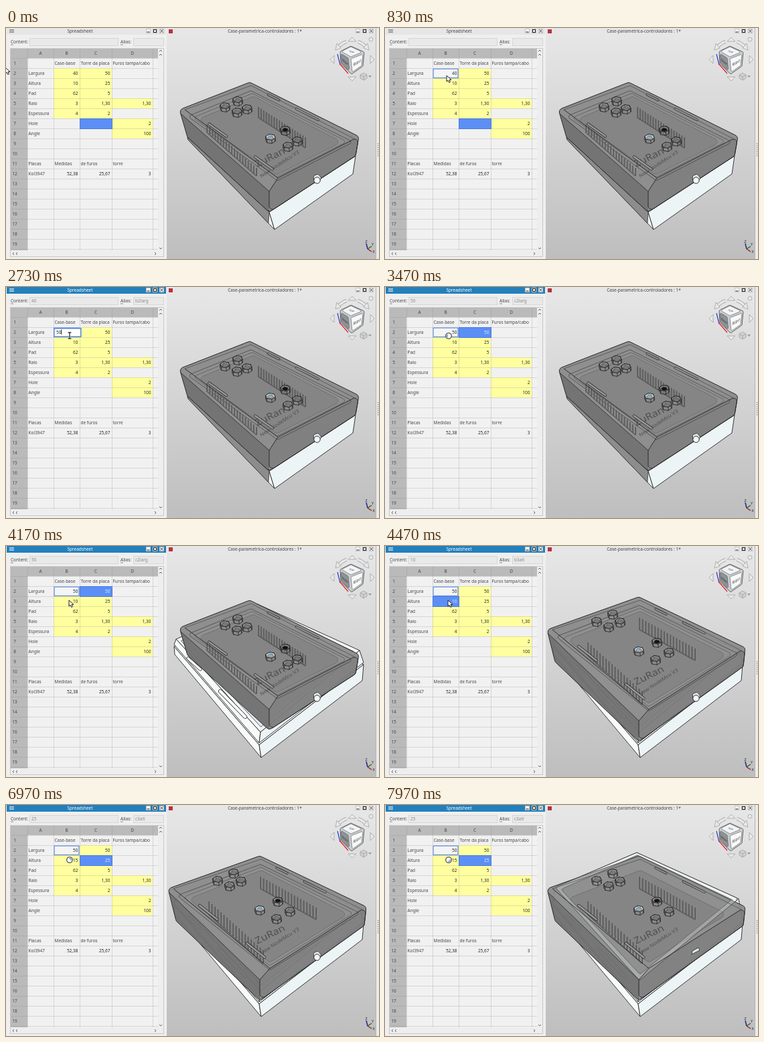
Recreate the animation shown at these times as an HTML page with a canvas. Size 557 by 345 pixels, loop 8000 ms.

```html
<!DOCTYPE html>
<html lang="pt">
<head>
<meta charset="utf-8">
<title>Spreadsheet</title>
<style>
  html, body { margin: 0; width: 100%; height: 100%; overflow: hidden; background: #efefef; }
  canvas { display: block; width: 557px; height: 345px; }
</style>
</head>
<body>
<canvas id="stage"></canvas>
<script>
const LOOP = 8000;
const FONT = '"Noto Sans", "Open Sans", sans-serif';
const INK = '#474747', BLUE = '#5c8ff6', FOCUS = '#6d93d8', YELLOW = '#ffffa0';
const canvas = document.getElementById('stage');
const ratio = window.devicePixelRatio || 1;
canvas.width = 557 * ratio;
canvas.height = 345 * ratio;
const c = canvas.getContext('2d');

// ---------- drawing helpers ----------
function rect(x, y, w, h, fill, stroke) {
  if (fill) { c.fillStyle = fill; c.fillRect(x, y, w, h); }
  if (stroke) { c.strokeStyle = stroke; c.lineWidth = 1; c.strokeRect(x + .5, y + .5, w - 1, h - 1); }
}

function text(s, x, y, align = 'left', color = INK, size = 6.5) {
  c.font = `${size}px ${FONT}`;
  c.textAlign = align;
  c.fillStyle = color;
  c.fillText(s, x, y + size * .36);
}

function line(pts, color, width = 1) {
  c.beginPath();
  pts.forEach(p => c.lineTo(...p));
  c.strokeStyle = color;
  c.lineWidth = width;
  c.stroke();
}

// Closed polygon, optionally with rounded corners.
function poly(pts, fill, stroke, width = .9, r = 0) {
  const n = pts.length, last = pts[n - 1];
  c.beginPath();
  if (r) {
    c.moveTo((last[0] + pts[0][0]) / 2, (last[1] + pts[0][1]) / 2);
    pts.forEach((p, i) => c.arcTo(...p, ...pts[(i + 1) % n], r));
  } else {
    pts.forEach(p => c.lineTo(...p));
  }
  c.closePath();
  if (fill) { c.fillStyle = fill; c.fill(); }
  if (stroke) { c.strokeStyle = stroke; c.lineWidth = width; c.stroke(); }
}

function disc(x, y, r, fill, stroke, width = 1) {
  c.beginPath();
  c.arc(x, y, r, 0, 7);
  if (fill) { c.fillStyle = fill; c.fill(); }
  if (stroke) { c.strokeStyle = stroke; c.lineWidth = width; c.stroke(); }
}

const mix = (a, b, k) => [a[0] + (b[0] - a[0]) * k, a[1] + (b[1] - a[1]) * k];
const shift = ([x, y], dx, dy) => [x + dx, y + dy];
const down = (p, d) => shift(p, 0, d);
// Point on a quad [left, front, right, back]: u runs left to front, v left to back.
const at = (q, u, v) => mix(mix(q[0], q[1], u), mix(q[3], q[2], u), v);
const inset = (q, k) => [at(q, k, k), at(q, 1 - k, k), at(q, 1 - k, 1 - k), at(q, k, 1 - k)];

// ---------- timeline ----------
function sheetState(t) {
  const s = { active: t >= 1100, content: '', alias: '', sel: 'C7', b2: '40', b3: '10', edit: null };
  if (t >= 1100) Object.assign(s, { content: '40', alias: 'b2larg', sel: 'B2' });
  if (t >= 1700) s.sel = '', s.edit = { row: 2, value: t < 1870 ? '5' : '50', caret: t < 2230 || t >= 2730 };
  if (t >= 2900) Object.assign(s, { content: '50', alias: 'c2larg', sel: 'C2', b2: '50', edit: null });
  if (t >= 4470) Object.assign(s, { content: '10', alias: 'b3alt', sel: 'B3' });
  if (t >= 5730) s.sel = '', s.edit = { row: 3, value: t < 5870 ? '1' : '15', caret: t < 6000 || t >= 6500 };
  if (t >= 6830) Object.assign(s, { content: '25', alias: 'c3alt', sel: 'C3', b3: '15', edit: null });
  return s;
}

function pointer(t) {
  if (t < 1700) {
    const k = Math.min(1, Math.max(0, (t - 300) / 530));
    return ['arrow', ...mix([-1, 59], [92, 71], k * k * (3 - 2 * k))];
  }
  if (t < 2900) return ['beam', 95, 72.5];
  if (t < 4150) return ['busy', 95, 73 + 7 * Math.min(1, Math.max(0, (t - 3500) / 200))];
  if (t < 5730) return ['arrow', 94, 81];
  if (t < 6830) return ['beam', 95, 82];
  return ['busy', 95, 82];
}

// ---------- windows ----------
function titleBar(x, w, title, mid, active) {
  rect(x, 0, w, 10, active ? '#2280bd' : '#e6e6e6');
  text(title, mid, 4.8, 'center', active ? '#fff' : '#444');
}

function buttons(x) {
  [0, 10, 20].forEach(d => rect(x + d, 1, 7, 7, '#f6f6f6', '#c4c4c4'));
  line([[x + 1.5, 6], [x + 5.5, 6]], '#222');
  rect(x + 11, 2, 5, 5, null, '#222');
  line([[x + 21.5, 2.5], [x + 25.5, 6.5]], '#222');
  line([[x + 25.5, 2.5], [x + 21.5, 6.5]], '#222');
}

function chevron(x, y, dx, dy) {
  line([[x - dx - dy * 2, y - dy - dx * 2], [x + dx, y + dy], [x - dx + dy * 2, y - dy + dx * 2]], '#555', .9);
}

// ---------- spreadsheet ----------
const COLS = { A: [32, 71], B: [71, 110], C: [110, 158], D: [158, 219] };
const rowTop = n => 30 + 15 * n;
const yellow = new Set('B2 B3 B4 B5 B6 C2 C3 C4 C5 C6 D5 D7 D8'.split(' '));
const labels = {
  B1: 'Case-base', C1: 'Torre da placa', D1: 'Furos tampa/cabo', A2: 'Largura', A3: 'Altura', A4: 'Pad',
  A5: 'Raio', A6: 'Espessura', A7: 'Hole', A8: 'Angle', A11: 'Placas', B11: 'Medidas', C11: 'de furos',
  D11: 'torre', A12: 'Kol3947'
};
const numbers = {
  C2: '50', C3: '25', B4: '62', C4: '5', B5: '3', C5: '1,30', D5: '1,30', B6: '4', C6: '2',
  D7: '2', D8: '100', B12: '52,38', C12: '25,67', D12: '3'
};

function cellBox(id) {
  const [l, r] = COLS[id[0]];
  return [l, rowTop(+id.slice(1)), r - l, 15];
}

function sheet(t) {
  const s = sheetState(t);
  rect(0, 0, 240, 345, '#efefef');
  titleBar(1, 238, 'Spreadsheet', 110.5, s.active);
  [2.5, 4.5, 6.5].forEach(y => line([[5, y], [12, y]], s.active ? '#d8e8f2' : '#777'));
  buttons(209);
  text('Content:', 7, 21);
  text('Alias:', 171, 21);
  line([[7, 25], [11, 25]], INK, .6);
  line([[171, 25], [175, 25]], INK, .6);
  rect(35, 15, 133, 12, '#e9e9e9', '#d6d6d6');
  rect(190, 15, 46, 12, '#e9e9e9', '#d6d6d6');
  text(s.content, 38, 21, 'left', '#8a8a8a');
  text(s.alias, 193, 21, 'left', '#8a8a8a');

  rect(6, 30, 230, 312, '#f1f1f1', '#c8c8c8');
  rect(7, 31, 220, 14, '#bababa');
  rect(7, 31, 25, 301, '#bababa');
  yellow.forEach(id => rect(...cellBox(id), YELLOW));

  for (let n = 1; n <= 20; n++) {
    const y = rowTop(n) + .5;
    line([[7, y], [32, y]], '#adadad');
    line([[32, y], [227, y]], 'rgba(120,120,120,.22)');
  }
  [32, 71, 110, 158, 219].forEach(x => {
    line([[x + .5, 31], [x + .5, 45]], '#adadad');
    line([[x + .5, 45], [x + .5, 332]], 'rgba(120,120,120,.22)');
  });

  if (t >= 700) {
    rect(71, 60, 39, 15, '#f4f4f4');
    c.strokeStyle = FOCUS;
    c.lineWidth = 1.4;
    c.strokeRect(72, 61, 37, 13.5);
  }
  if (s.sel) {
    const [x, y, w, h] = cellBox(s.sel);
    rect(x, y, w + 1, h + 1, BLUE, '#4a7ae0');
  }

  for (const col in COLS) text(col, (COLS[col][0] + COLS[col][1]) / 2, 38, 'center');
  for (let n = 1; n <= 19; n++) text(n, 13, rowTop(n) + 7.5, 'center');
  for (const id in labels) {
    const [x, y] = cellBox(id);
    text(labels[id], x + 1.5, y + 7.5);
  }
  const values = { ...numbers, B2: s.b2, B3: s.b3 };
  for (const id in values) {
    const [x, y, w] = cellBox(id);
    text(values[id], x + w - 2.5, y + 7.5, 'right', id === s.sel ? '#e4ecff' : '#2a2a2a');
  }

  if (s.edit) {
    const y = rowTop(s.edit.row);
    rect(71, y + 1, 41, 14, '#fff');
    c.strokeStyle = '#4f83dc';
    c.lineWidth = 1.5;
    c.strokeRect(71.8, y + 1.8, 40, 12.4);
    text(s.edit.value, 75, y + 7.2, 'left', '#222');
    const x = 75.3 + 3.72 * s.edit.value.length;
    if (s.edit.caret) line([[x, y + 3.5], [x, y + 11]], '#111', .9);
  }

  rect(227, 31, 8, 301, '#eeeeee');
  rect(7, 332, 228, 9, '#eeeeee');
  chevron(231, 34, 0, -1);
  chevron(231, 40, 0, -1);
  chevron(231, 329, 0, 1);
  chevron(11, 337, -1, 0);
  chevron(16, 337, -1, 0);
  chevron(223, 337, 1, 0);
}

// ---------- enclosure model ----------
const EDGE = '#252525';
const smallCase = {
  top: [[264, 121], [406, 224], [527, 162], [364, 81]],
  low: [[271, 163], [393, 275], [522, 191]],
  nuts: [[346, 109], [327, 118], [360, 121], [345, 126], [395, 165], [417, 153], [435, 169], [421, 177]],
  pins: [[[300, 144], [374, 209], 12], [[377, 118], [447, 163], 16]]
};
const wideCase = {
  top: [[247, 124], [394, 244], [538, 152], [379, 76]],
  low: [[254, 173], [379, 292], [535, 180]],
  nuts: [[340, 102], [316, 113], [351, 114], [334, 121], [379, 157], [406, 144], [424, 159], [404, 170]],
  pins: [[[303, 144], [384, 217], 20], [[380, 107], [463, 153], 18]]
};
const smallFoot = [[272, 167], [401, 301], [518, 218]];
const wideFoot = [[252, 162], [381, 316], [532, 201]];
const wideRim = [[251, 150], [378, 297], [534, 177], [380, 104]];
const wideLip = [[254, 139], [380, 278], [528, 156], [376, 87]];
const tallLip = wideLip.map(p => down(p, -16));

function capsule(a, b, fill, w) {
  c.lineCap = 'round';
  line([a, b], EDGE, w);
  line([a, b], fill, w - 1.4);
  c.lineCap = 'butt';
}

function walls([l, f, r], [l2, f2, r2]) {
  poly([l, f, f2, l2], '#f8fafa', EDGE);
  poly([f, r, r2, f2], '#edf4f6', EDGE);
}

function ring(x, y, rx, ry) {
  return [0, 1, 2, 3, 4, 5].map(k =>
    [x + rx * Math.cos(k * 1.047 + .25), y + ry * Math.sin(k * 1.047 + .25)]);
}

function nut([x, y], i) {
  const a = ring(x, y - 2, 7.5, 4.6), b = ring(x, y + 3, 7.5, 4.6);
  poly(b, 'rgba(150,150,150,.35)', '#1c1c1c', .8);
  a.forEach((p, k) => line([p, b[k]], '#1c1c1c', .8));
  poly(a, i === 4 ? '#c9cdce' : 'rgba(155,155,155,.5)', '#151515', .9);
  poly(ring(x, y - 1, 4.6, 2.8), i === 5 ? '#111' : 'rgba(110,110,110,.4)', '#444', .5);
  if (i === 4) line([[x - 3, y - 5], [x + 2, y - 5.5], [x + 2, y - 2]], '#36a5d8', 1);
}

function pinRow([a, b, h]) {
  line([down(a, h), down(b, h)], '#5e5e5e', 1.6);
  for (let i = 0; i < 19; i++) {
    const p = mix(a, b, i / 18);
    line([p, down(p, h)], '#555', 2);
    line([[p[0] - .6, p[1]], [p[0] - .6, p[1] + h - 1]], '#808080', .6);
  }
}

function engraving(s, x, y, size, ang) {
  c.save();
  c.transform(Math.cos(ang), Math.sin(ang), .42, .78, x, y);
  c.font = `${size}px ${FONT}`;
  c.textAlign = 'left';
  c.fillStyle = '#505050';
  c.fillText(s, 0, 0);
  c.restore();
}

function lid(m, raised) {
  const [L, F, R, B] = m.top, [l, f, r] = m.low;
  // The long sides roll over into the top; the right end is flat.
  const side = shift(L, -3, 7), nose = shift(f, 0, -31);
  const end = [f, nose, F, R, r];
  poly([shift(L, -5, 1), B, R, r, f, l], 'rgba(138,138,138,.93)', EDGE, 1, 6);
  poly(inset(m.top, .09).map(p => down(p, 10)), '#858585', '#666', .7, 5);
  const lip = raised ? tallLip : inset(m.top, .03).map(p => down(p, 9));
  const inner = inset(lip, .035);
  if (raised) {
    lip.forEach((p, i) => {
      const j = (i + 1) % 4;
      poly([p, lip[j], inner[j], inner[i]], 'rgba(225,232,235,.3)');
    });
  }
  poly(lip, null, '#4a4a4a', .8, 3);
  poly(inner, null, '#555', .7, 3);
  poly([side, nose, f, l], 'rgba(60,60,60,.32)');
  poly(end, 'rgba(70,70,70,.2)', EDGE, .9, 5);

  m.pins.forEach(pinRow);
  engraving('ZuRan', 375, 208, 16, -.46);
  engraving('New NodeMcu V3', 381, 224, 8.2, -.58);
  m.nuts.forEach(nut);

  line([shift(L, 3, 1), F], EDGE, .9);
  line([side, nose], '#333', .9);
  line([shift(L, 3, 1), shift(B, 2, 5), shift(R, -6, 4)], '#4a4a4a', .7);
  [[.24, .42], [.72, .9]].forEach(([a, b]) => capsule(at(m.top, a, .05), at(m.top, b, .05), '#999', 4));
  [[.2, .3], [.46, .66]].forEach(([a, b]) => capsule(at(m.top, a, .95), at(m.top, b, .95), '#959595', 3.4));
}

function wideBase(raised) {
  const lip = raised ? tallLip : wideLip;
  poly(wideRim, '#f3f7f8', EDGE);
  walls(wideRim, wideFoot);
  poly(lip, '#f3f7f8', EDGE);
  poly(inset(lip, .03), '#e4e9eb', EDGE, .7);
  walls(lip, wideRim.map(p => down(p, -3)));
  capsule([272, 168], [290, 184], '#fff', 5);
  capsule([320, 217], [357, 255], '#fff', 6);
}

function model(t) {
  const wide = t >= 3700, wideLid = t >= 4200, raised = t >= 7630;
  if (wide) wideBase(raised);
  else walls(smallCase.low, smallFoot);
  if (!wide) poly([smallCase.low[0], smallCase.low[1], mix(smallFoot[0], smallFoot[1], .93), smallFoot[0]], '#8c8c8c', EDGE, .7);
  lid(wideLid ? wideCase : smallCase, raised);
  if (raised) {
    poly([[458, 223], [459, 218], [468, 213], [470, 217]], '#dfe6e8', EDGE, .8);
  } else {
    poly([[459, 221], [466, 218], [471, 224], [467, 231], [460, 229]], '#e6eaec', EDGE, .8, 3);
    disc(464.5, 227.5, 4.7, '#f5f8f9', EDGE);
  }
}

// ---------- 3D view ----------
function label(s, x, y, a, b, d, e) {
  c.save();
  c.transform(a, b, d, e, x, y);
  text(s, 0, 0, 'center', '#222', 5.5);
  c.restore();
}

function navCube() {
  const pale = '#e9e9e9', rim = '#9a9a9a';
  poly([[484, 47], [490, 41], [490, 53]], pale, rim, .7);
  poly([[550, 47], [544, 41], [544, 53]], pale, rim, .7);
  poly([[517, 79], [511, 73], [523, 73]], pale, rim, .7);
  poly([[517, 14], [511, 20], [523, 20]], pale, rim, .7);
  disc(545, 17, 3, pale, rim, .7);
  [-1, 1].forEach(k => {
    c.beginPath();
    c.arc(517, 46, 27, -1.57 + k * .32, -1.57 + k * .85, k < 0);
    c.strokeStyle = rim; c.lineWidth = 5; c.stroke();
    c.strokeStyle = pale; c.lineWidth = 3.6; c.stroke();
    poly([[517 + k * 25, 33], [517 + k * 17, 30], [517 + k * 23, 23]], pale, rim, .7);
  });
  line([[495, 39], [499, 55]], '#2436d6', 1.2);
  line([[498, 53], [511, 68]], '#e02020', 1.2);
  poly([[499, 35], [515, 27], [535, 36], [533, 57], [516, 69], [500, 53]], '#c9cdd0', '#444', .8, 2);
  poly([[501, 35], [515, 28], [532, 36], [515, 43]], '#f2f4f5', '#555', .6, 1.5);
  poly([[500, 38], [511, 45], [513, 65], [501, 52]], '#8f9396', '#555', .6, 1.5);
  poly([[515, 46], [533, 39], [531, 56], [517, 66]], '#f7f8f8', '#555', .6, 1.5);
  label('TOP', 516, 35.5, .7, .24, -.55, .4);
  label('FRONT', 506.5, 51, .5, .42, 0, .9);
  label('RIGHT', 524.5, 52, .72, -.38, 0, 1);
  poly([[529, 70], [534, 67], [539, 70], [539, 75], [534, 78], [529, 75]], '#d2d2d2', rim, .7);
  line([[529, 70], [534, 73], [539, 70]], rim, .7);
  line([[534, 73], [534, 78]], rim, .7);
  poly([[541, 71], [546, 71], [543.5, 74]], '#999');
}

function view(t) {
  const sky = c.createLinearGradient(0, 10, 0, 345);
  sky.addColorStop(0, '#e6e6e6');
  sky.addColorStop(1, '#bebebe');
  rect(240, 0, 317, 345, '#ebebeb');
  rect(240, 10, 312, 335, sky);
  titleBar(240, 312, 'Case-parametrica-controladores : 1*', 386.5, false);
  rect(243, 2, 6, 6, '#b8323c');
  buttons(522);
  line([[239.5, 0], [239.5, 345]], '#aaa');
  line([[552.5, 0], [552.5, 345]], '#b4b4b4');
  for (let y = 172; y < 191; y += 3) rect(555, y, 1, 1.5, '#777');
  model(t);
  navCube();
  line([[540, 330], [538, 322]], '#1c2a9c', 1.5);
  line([[540, 330], [546, 326]], '#1c6a2c', 1.3);
  line([[540, 330], [546, 334]], '#a02020', 1.5);
  text('Z', 538, 319, 'center', '#222', 5.5);
  text('Y', 547.5, 323.5, 'center', '#222', 5.5);
  text('X', 549, 334, 'center', '#222', 5.5);
}

function drawPointer(t) {
  const [kind, x, y] = pointer(t);
  if (kind === 'arrow') {
    const shape = [[0, 0], [0, 9], [2.2, 7.2], [3.8, 10.5], [5.5, 9.6], [4, 6.5], [7, 6.3]];
    poly(shape.map(p => shift(p, x, y)), '#fbfbfb', '#222', 1);
  } else if (kind === 'beam') {
    [['#fff', 2.4], ['#111', 1.2]].forEach(([color, w]) => {
      line([[x, y - 4.5], [x, y + 4.5]], color, w);
      line([[x - 2.5, y - 4.5], [x + 2.5, y - 4.5]], color, w);
      line([[x - 2.5, y + 4.5], [x + 2.5, y + 4.5]], color, w);
    });
  } else {
    const a = Math.floor(t / 33) * .26;
    disc(x, y, 4.3, '#f6f6f6', '#2d3338', 1.1);
    c.beginPath();
    c.arc(x, y, 2.3, a, a + 2);
    c.strokeStyle = '#4f83dc';
    c.lineWidth = 1.2;
    c.stroke();
  }
}

function frame(now) {
  const t = now % LOOP;
  c.setTransform(ratio, 0, 0, ratio, 0, 0);
  view(t);
  sheet(t);
  drawPointer(t);
  requestAnimationFrame(frame);
}
requestAnimationFrame(frame);
</script>
</body>
</html>
```
